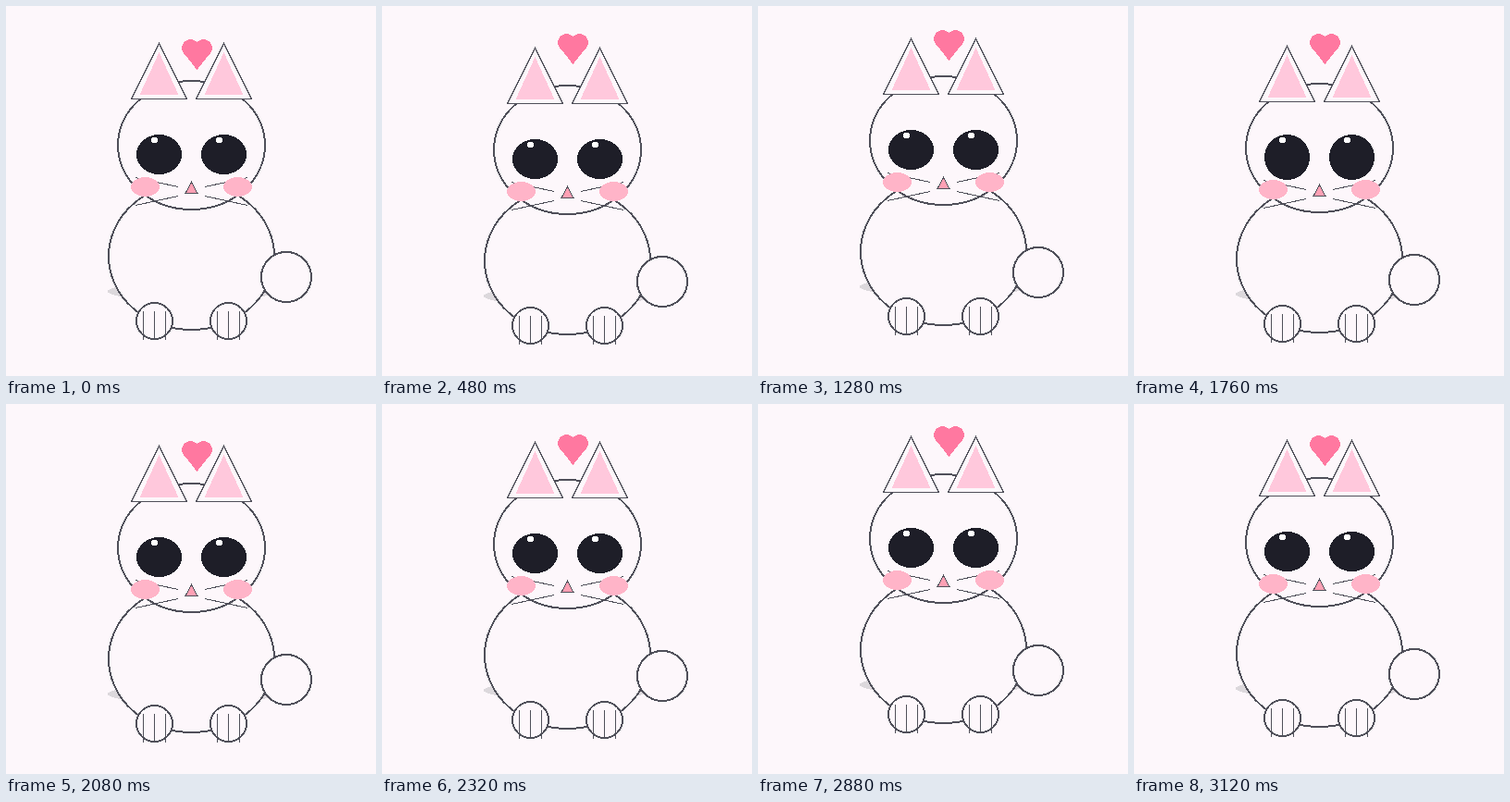
Animation of 400 by 400 pixels, one loop 3.2 s. Source, as an HTML page:

```html
<!DOCTYPE html>
<html lang="en">
<head>
<meta charset="utf-8">
<title>Bobbing cat</title>
<style>
  html, body { margin: 0; width: 100%; height: 100%; overflow: hidden; background: #fdf7fb; }
  svg { display: block; width: 100vw; height: 100vh; shape-rendering: crispEdges; }
  .line { fill: #fdf7fb; stroke: #50505a; stroke-width: 2; }
  .thin { fill: #fdf7fb; stroke: #50505a; stroke-width: 1; }
  .blush { fill: #ffb4c8; }
</style>
</head>
<body>
<svg viewBox="0 0 400 400">
  <defs>
    <g id="ear">
      <path class="thin" d="M165.5 40.5L195.5 100.5H135.5Z"/>
      <path fill="#ffc8dc" d="M165.5 50L186.5 96H144.5Z"/>
    </g>
    <g id="paw">
      <circle class="line" cx="160.5" cy="340.5" r="19.5"/>
      <path class="thin" d="M148.5 330V361M160.5 330V361M172.5 330V361"/>
    </g>
    <g id="eye">
      <ellipse class="ball" cx="165.5" cy="160.5" rx="24.5" fill="#1e1e28"/>
      <circle class="glint" cx="160.5" r="3.5" fill="#fff"/>
    </g>
  </defs>
  <g id="cat">
    <ellipse cx="200.5" cy="308.5" rx="90.5" ry="10.5" fill="#dcd8dc"/>
    <ellipse class="line" cx="200.5" cy="270.5" rx="89.5" ry="79.5"/>
    <circle class="line" cx="303" cy="293" r="27"/>
    <use href="#paw"/>
    <use href="#paw" x="80"/>
    <ellipse class="line" cx="200.5" cy="150.5" rx="79.5" ry="69.5"/>
    <use href="#ear"/>
    <use href="#ear" x="70"/>
    <use href="#eye"/>
    <use href="#eye" x="70"/>
    <path class="thin" d="M140 185.5L186 195.5M140 215.5L186 205.5M261 185.5L215 195.5M261 215.5L215 205.5" style="fill:none"/>
    <ellipse class="blush" cx="150.5" cy="195.5" rx="15.5" ry="10.5"/>
    <ellipse class="blush" cx="250.5" cy="195.5" rx="15.5" ry="10.5"/>
    <path class="thin" d="M200.5 190.5L207 202.5H194Z" style="fill:#ffa0b4"/>
  </g>
  <g id="heart" fill="#ff78a0">
    <circle cx="199.5" cy="45.5" r="9.5"/>
    <circle cx="213.5" cy="45.5" r="9.5"/>
    <path d="M191 49.5H222L206.5 69Z"/>
  </g>
</svg>
<script>
  const STEP = 80, STEPS = 40, EYE_Y = 160.5;
  const cat = document.getElementById("cat");
  const heart = document.getElementById("heart");
  const ball = document.querySelector(".ball");
  const glint = document.querySelector(".glint");

  const shift = (node, y) => node.setAttribute("transform", `translate(0 ${y})`);

  function draw(time) {
    const step = Math.floor(time / STEP) % STEPS;
    const turn = 2 * Math.PI * step / STEPS;

    // Whole-pixel bobbing: two cycles for the cat, three more on top for the heart.
    const bob = Math.trunc(6 * Math.sin(2 * turn));
    const floating = Math.trunc(6 * Math.cos(3 * turn)) - 6;
    shift(cat, bob);
    shift(heart, bob + floating);

    // Eyes alternate between wide open and slightly squinting.
    const eyeRadius = Math.sin(4 * turn) > 0 ? 24.5 : 21.5;
    ball.setAttribute("ry", eyeRadius);
    glint.setAttribute("cy", EYE_Y - eyeRadius + 6);
  }

  function tick() {
    draw(performance.now());
    requestAnimationFrame(tick);
  }
  tick();
</script>
</body>
</html>
```
